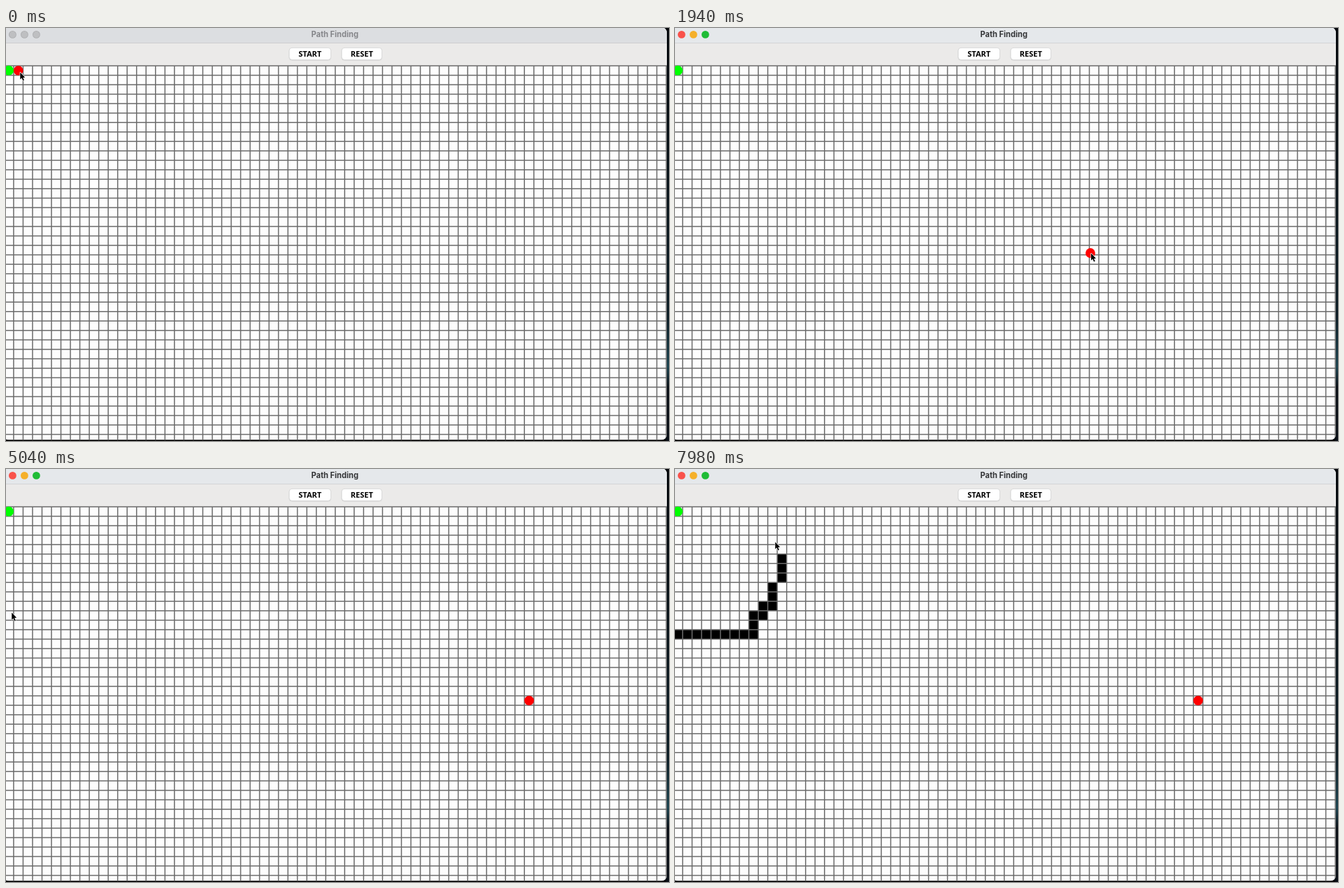
These frames come from a looping animation (948x591 px, 8000 ms). An HTML page with a canvas:

```html
<!DOCTYPE html>
<html lang="en">
<head>
<meta charset="utf-8">
<title>Path Finding</title>
<style>
  html, body { margin: 0; width: 100%; height: 100%; overflow: hidden; background: #05080b; }
  canvas { display: block; }
</style>
</head>
<body>
<canvas id="stage" width="948" height="591"></canvas>
<script>
const ctx = document.getElementById('stage').getContext('2d');
const LOOP = 8000;
const CELL = 13.525, LEFT = 10.9 - CELL, TOP = 54.1;
const RIGHT = 945, BOTTOM = 589.5;
const ACTIVATE = 20, RELEASE = 3200;

const linear = k => k;
const easeIn = k => k ** 1.7;
const easeOut = k => 1 - (1 - k) ** 1.5;
const easeInOut = k => k * k * (3 - 2 * k);

// Pointer moves: start, end, destination, easing
const moves = [
  [20, 1380, 403, 228, easeIn],
  [1380, 1560, 496, 287, linear],
  [1640, 2400, 682, 353, easeOut],
  [2480, 2540, 695, 353, linear],
  [2620, 3060, 749, 333, easeInOut],
  [3730, 4220, 9, 204, easeInOut],
  [5000, 5300, 1, 212, linear],
  [6000, 6560, 102, 212, linear],
  [6560, 6740, 111, 193, linear],
  [6820, 7580, 141, 129, linear],
  [7660, 7980, 143, 104, linear]
];

function pointerAt(t) {
  let x = 20, y = 63;
  for (const [start, end, toX, toY, ease] of moves) {
    if (t <= start) break;
    const k = ease(Math.min(1, (t - start) / (end - start)));
    x += (toX - x) * k;
    y += (toY - y) * k;
  }
  return [x, y];
}

// The wall grows one cell per letter: R right, U up, D diagonal
const STEPS = 'RRRRRRRRUURURUUDUU';
const wallTime = i => i < 10 ? 6020 + i * 75 : 6840 + (i - 10) * 120;

function wallCells(t) {
  const cells = [];
  let col = 0, row = 13;
  for (let i = 0; i <= STEPS.length && t >= wallTime(i); i++) {
    cells.push([col, row]);
    if (STEPS[i] !== 'U') col++;
    if (STEPS[i] !== 'R') row--;
  }
  return cells;
}

const cellX = col => LEFT + col * CELL;
const cellY = row => TOP + row * CELL;
const cellCenter = (col, row) => [cellX(col) + CELL / 2, cellY(row) + CELL / 2];

function rect(x, y, w, h, color) {
  ctx.fillStyle = color;
  ctx.fillRect(x, y, w, h);
}

function roundRect(x, y, w, h, radius, fill, stroke) {
  ctx.beginPath();
  ctx.roundRect(x, y, w, h, radius);
  ctx.fillStyle = fill;
  ctx.fill();
  if (stroke) { ctx.strokeStyle = stroke; ctx.lineWidth = 1; ctx.stroke(); }
}

function disc(x, y, r, fill) {
  ctx.beginPath();
  ctx.arc(x, y, r, 0, Math.PI * 2);
  ctx.fillStyle = fill;
  ctx.fill();
}

function text(str, x, y, font, color) {
  ctx.font = font;
  ctx.fillStyle = color;
  ctx.textAlign = 'center';
  ctx.fillText(str, x, y);
}

function button(x, w, label) {
  roundRect(x, 28.5, w, 18, 4.5, '#cfcfcf');
  roundRect(x + 0.5, 28.3, w - 1, 17.2, 4, '#fff', '#d9d9d9');
  text(label, x + w / 2, 40.6, '600 11px "Noto Sans", "Open Sans", sans-serif', '#000');
}

function desktop() {
  const glow = ctx.createLinearGradient(0, 0, 0, 591);
  glow.addColorStop(0, '#05080c');
  glow.addColorStop(0.7, '#0c1d26');
  glow.addColorStop(0.82, '#1d4450');
  glow.addColorStop(0.87, '#0a0f16');
  rect(0, 0, 948, 591, glow);
  rect(0, 589, 944, 2, '#050505');
}

function header(active) {
  rect(0, 0, RIGHT, 22, active ? '#e5e8eb' : '#dcdee1');
  rect(0, 21, RIGHT, 1, active ? '#d3d4d6' : '#cdced0');
  rect(0, 22, RIGHT, 32, '#ebeae9');
  ['#f9524b', '#f5b02a', '#1fbc36'].forEach((color, i) => {
    const x = 9.4 + i * 17;
    disc(x, 9.4, 5.4, active ? color : '#acadaf');
    if (!active) disc(x, 9.4, 4.6, '#bebfc1');
  });
  text('Path Finding', 470.2, 13, '700 11.1px Inter, sans-serif', active ? '#343537' : '#85868a');
  button(404.5, 60.5, 'START');
  button(479.5, 58.5, 'RESET');
}

function grid() {
  for (let x = cellX(1); x < RIGHT; x += CELL) rect(x - 0.75, TOP, 1.5, BOTTOM, '#6b6b6b');
  for (let y = TOP; y < BOTTOM; y += CELL) rect(0, y - 0.75, RIGHT, 1.5, '#6b6b6b');
}

function cursor(x, y) {
  ctx.beginPath();
  [[0.3, 0.5], [0.3, 10.6], [2.6, 8.6], [4.3, 12.5], [5.9, 11.8], [4.3, 8], [7.2, 7.7]]
    .forEach(([dx, dy]) => ctx.lineTo(x + dx, y + dy));
  ctx.closePath();
  ctx.lineJoin = 'round';
  ctx.strokeStyle = '#fff';
  ctx.lineWidth = 1.2;
  ctx.stroke();
  ctx.fillStyle = '#000';
  ctx.fill();
}

function draw(t) {
  const [px, py] = pointerAt(t);
  desktop();
  ctx.save();
  ctx.beginPath();
  ctx.roundRect(-4, -1, RIGHT + 4, BOTTOM + 1, 8);
  ctx.clip();
  rect(0, 0, RIGHT, BOTTOM, '#fdfdfd');
  header(t >= ACTIVATE);
  wallCells(t).forEach(([col, row]) => rect(cellX(col), cellY(row), CELL, CELL, '#000'));
  grid();
  disc(...cellCenter(0, 0), 7, '#00ff00');
  const goal = t < ACTIVATE ? cellCenter(1, 0) : t < RELEASE ? [px - 0.8, py] : cellCenter(55, 20);
  disc(...goal, 6.9, '#ff0000');
  ctx.restore();
  cursor(px, py);
}

function tick(now) {
  draw(now % LOOP);
  requestAnimationFrame(tick);
}
requestAnimationFrame(tick);
</script>
</body>
</html>
```
